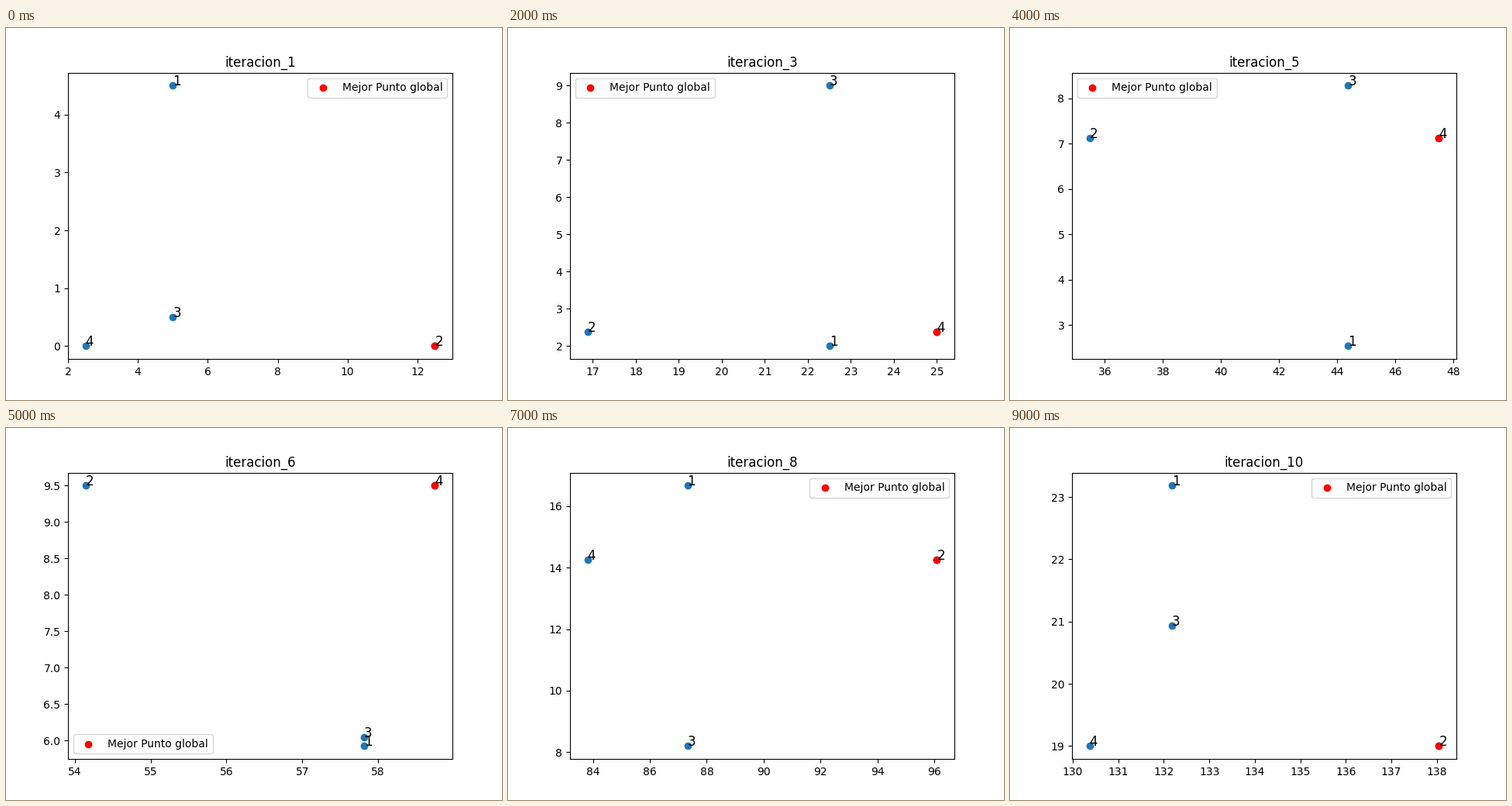
Write a matplotlib script that moves like this. It is 640x480 px and loops after 10 s.

```python
import numpy as np
import matplotlib.pyplot as plt
from matplotlib.animation import FuncAnimation

STEPS = 10
PULL = 0.5  # attraction towards the swarm's best point

START = np.array([[5, 4.5], [12.5, 0], [5, 0.5], [2.5, 0]])
SPEED = np.array([[5, 0.5], [2.5, 0], [5, 4.5], [6.25, 0]])


def swarm(steps):
    """Return a list of (positions, best point) for every iteration."""
    pos, vel = START.copy(), SPEED.copy()
    path = []
    for _ in range(steps):
        best = pos[np.argmax(3 * pos[:, 0] + pos[:, 1])]
        path.append((pos, best))
        vel = vel + PULL * (best - pos)
        pos = pos + vel
    return path


path = swarm(STEPS)
fig, ax = plt.subplots(figsize=(6.4, 4.8), dpi=100)


def draw(i):
    pos, best = path[i]
    ax.clear()
    ax.set_title(f"iteracion_{i + 1}")
    ax.scatter(pos[:, 0], pos[:, 1])
    for n, point in enumerate(pos, 1):
        ax.annotate(str(n), point, fontsize=12)
    ax.scatter(*best, color="red", label="Mejor Punto global")
    ax.legend(loc="best")
    return ax.get_children()


anim = FuncAnimation(fig, draw, frames=STEPS, init_func=lambda: draw(0),
                     interval=1000, repeat=True, repeat_delay=0, blit=False)
plt.show()
```
